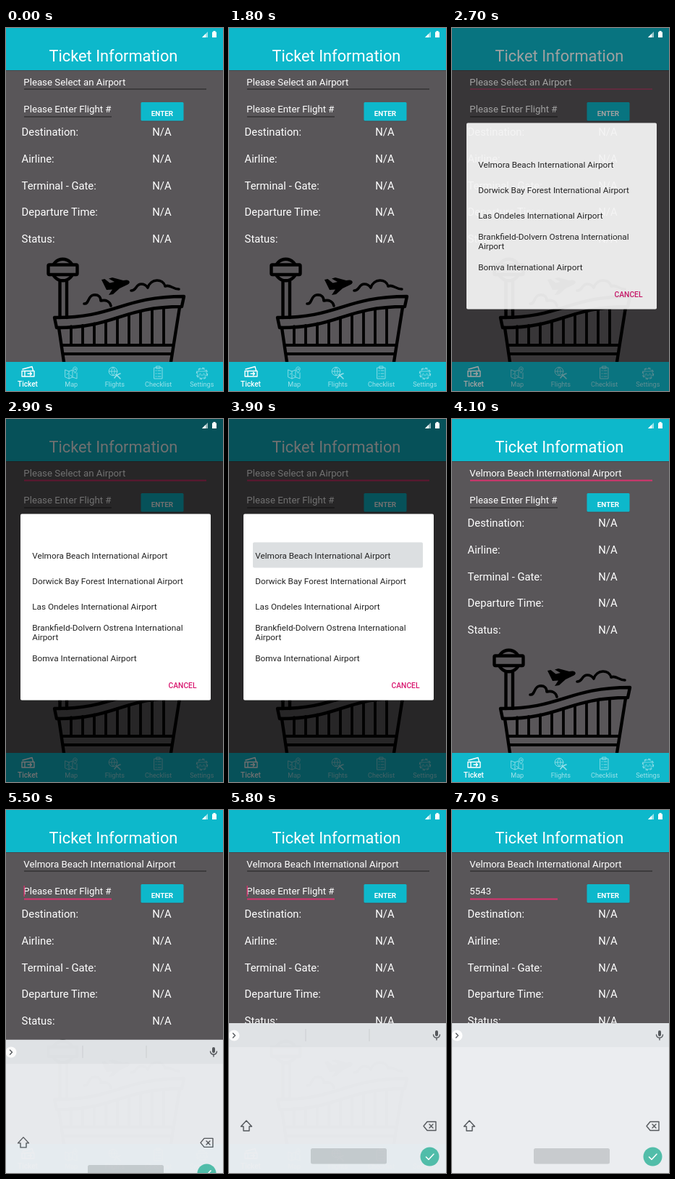
Animation of 300x499 px, one loop 8000 ms. Source, as an HTML page:

```html
<!DOCTYPE html>
<html lang="en">
<head>
<meta charset="utf-8">
<title>Ticket Information</title>
<style>
html, body { margin: 0; width: 100%; height: 100%; overflow: hidden; background: #595659; }
svg { display: block; width: 100vw; height: 100vh; }
text { font-family: Roboto, sans-serif; white-space: pre; }
.line { fill: none; stroke: #000; stroke-linecap: round; stroke-linejoin: round; }
.icon { fill: none; stroke: #fff; stroke-width: 1; stroke-linejoin: round; stroke-linecap: round; }
.key { fill: none; stroke: #54585c; stroke-width: 1.4; stroke-linejoin: round; stroke-linecap: round; }
</style>
</head>
<body>
<svg viewBox="0 0 300 499" xmlns="http://www.w3.org/2000/svg">
  <defs>
    <filter id="soft" x="-20%" y="-20%" width="140%" height="150%">
      <feDropShadow dx="0" dy=".6" stdDeviation=".6" flood-opacity=".3"/>
    </filter>
  </defs>
  <rect width="300" height="499" fill="#595659"/>

  <g class="line" stroke-width="4.4">
    <circle cx="78.5" cy="332.5" r="14.8"/>
    <rect x="58.5" y="325.5" width="40" height="13.5" rx="1.5" fill="#595659"/>
    <path d="M74.5 348V398M84 348V398"/>
    <path d="M67 398C150 399 160 369 246 369L243 383C160 383 152 412 70 412Z"/>
    <path d="M73 412L80 459M240 384L228 459"/>
    <path d="M77 436H231M79 448H229" stroke-width="3.8"/>
    <g id="posts"></g>
    <path d="M108 379C115 380 113 368 121 367C128 366 131 370 131 375C138 373 144 376 145 382" stroke-width="3.6"/>
    <path d="M173 361C181 361 179 352 187 352C192 352 194 354 196 357C200 344 217 344 220 355C227 352 230 359 239 359" stroke-width="3.6"/>
  </g>
  <path d="M132 346L136.500 345L143.500 350.500L150 349L142 344.500L147 343L162 347L166 346.500C171 346 172.500 350.500 168.500 352.500L157 358L148 366L142 367L147 359.500L139 360Z"/>

  <g filter="url(#soft)"><rect y="-4" width="300" height="62" fill="#10b8cb"/></g>
  <text x="59.500" y="45.500" font-size="21.8" fill="#fff">Ticket Information</text>

  <g fill="#fff" font-size="13.25">
    <text id="airport" x="24.300" y="79"></text>
    <text id="flight" x="24.300" y="116"></text>
  </g>
  <rect id="line1" x="25" width="252"/>
  <rect id="line2" x="25" width="121"/>
  <rect id="cursor" y="104" width="1.4" height="15" fill="#d8336f"/>
  <rect x="186.500" y="102" width="59" height="25.500" rx="1.5" fill="#10b8cb" filter="url(#soft)"/>
  <text x="216" y="120.500" font-size="9.9" font-weight="700" fill="#fff" text-anchor="middle">ENTER</text>
  <g id="rows" font-size="14.8" fill="#fff"></g>

  <rect y="459" width="300" height="40" fill="#10b8cb"/>
  <g id="tabs" fill="#fff" text-anchor="middle"></g>
  <g class="icon">
    <g stroke-width="1.4">
      <path d="M22 471.500H39V479H22ZM23 469L36 465.500L37.500 471M26 471.500V479"/>
      <path d="M30 475.200H35.500M33.500 473.200L35.500 475.200L33.500 477.200"/>
    </g>
    <g opacity=".55" stroke-width=".9">
      <path d="M82 470L87 472L92 470V480L87 482L82 480ZM87 472V482M92 480L98 482V474M84 476L86 475M89 477L91 479"/>
      <path d="M95.500 474C90.500 468 93.500 466 95.500 466S100.500 468 95.500 474Z"/>
      <circle cx="95.500" cy="469" r=".6"/>
      <circle cx="148" cy="472" r="5.8"/>
      <path d="M142.500 472H153.500M148 466.500C145 470 145 474 148 477.500M148 466.500C151 470 151 474 148 477.500"/>
      <path d="M152.500 476.500L158 482M150 481L153 477L158 475" stroke-width="1.6"/>
      <path d="M205 467H216V482H205ZM208 465H213V468H208ZM207 471H208M210 471H214M207 475H208M210 475H214M207 479H208M210 479H214"/>
      <circle cx="271" cy="475" r="7.6" stroke-width="1.2" stroke-linecap="butt" stroke-dasharray="3.500 2.469"/>
      <circle cx="271" cy="475" r="6.4" stroke-width=".7"/>
      <path d="M267 478C267 474 270 474 270 478M272 478C272 474 275 474 275 478M266 472H276" stroke-width=".8"/>
    </g>
  </g>

  <rect id="scrim" width="300" height="499"/>
  <g id="dialog">
    <rect x="20" y="130.500" width="263" height="256" rx="2" fill="#fff" filter="url(#soft)"/>
    <rect id="press" x="33" y="169.500" width="235" height="35" rx="2" fill="#dcdfe1"/>
    <g id="list" font-size="11.8" fill="#222"></g>
    <text x="224.500" y="370" font-size="10.3" font-weight="500" fill="#d8176f">CANCEL</text>
  </g>

  <g id="keys">
    <rect y="293" width="300" height="206" fill="#ebedf0"/>
    <rect y="293" width="300" height="33" fill="#e3e6e9"/>
    <path id="seps" d="M106 301V318M194 301V318" stroke="#cdd1d4" stroke-width="1"/>
    <circle cx="7" cy="310" r="7.500" fill="#fff"/>
    <path class="key" d="M5.500 307L8.500 310L5.500 313"/>
    <rect x="285" y="303" width="4" height="8" rx="2" fill="#54585c"/>
    <path class="key" d="M282.500 309C283 314.500 291 314.500 291.500 309M287 313V316" stroke-width="1.2"/>
    <path class="key" d="M24 427L31.500 435H28V441H20V435H16.500Z"/>
    <path class="key" d="M269 434.500L274 428.500H286V440.500H274ZM277 432L282 437M282 432L277 437"/>
    <rect x="113" y="465" width="105" height="21.500" rx="2.500" fill="#c8cbce"/>
    <circle cx="277.500" cy="476.500" r="13" fill="#52bda9"/>
    <path class="key" d="M272.500 477L276 480.500L283 473" style="stroke:#fff;stroke-width:1.6"/>
  </g>

  <path d="M271 13H279V5Z" fill="#fff" opacity=".6"/>
  <path d="M271 13H276V8Z" fill="#fff"/>
  <path d="M285 5.500H286.500V4H289.500V5.500H291V13H285Z" fill="#fff"/>
</svg>
<script>
const $ = id => document.getElementById(id);
const clamp = x => Math.max(0, Math.min(1, x));
const easeOut = x => 1 - (1 - clamp(x)) ** 2;

function add(parent, tag, attrs, label = '') {
  const el = document.createElementNS('http://www.w3.org/2000/svg', tag);
  for (const k in attrs) el.setAttribute(k, attrs[k]);
  el.textContent = label;
  $(parent).appendChild(el);
}
function set(id, attrs) {
  for (const k in attrs) $(id).setAttribute(k, attrs[k]);
}

const chosen = 'Velmora Beach International Airport';
const choices = [
  [191.5, chosen],
  [227, 'Dorwick Bay Forest International Airport'],
  [262, 'Las Ondeles International Airport'],
  [290.5, 'Brankfield-Dolvern Ostrena International'],
  [304, 'Airport'],
  [332.5, 'Bomva International Airport']
];
choices.forEach(([y, s]) => add('list', 'text', { x: 36.2, y }, s));

['Destination:', 'Airline:', 'Terminal - Gate:', 'Departure Time:', 'Status:'].forEach((s, i) => {
  const y = 148 + i * 36.8;
  add('rows', 'text', { x: 21.6, y }, s);
  add('rows', 'text', { x: 202.3, y }, 'N/A');
});
['Ticket', 'Map', 'Flights', 'Checklist', 'Settings'].forEach((s, i) => {
  add('tabs', 'text', {
    x: 30 + i * 60.2, y: 493, 'font-size': i ? 9.1 : 10.1,
    'font-weight': i ? 400 : 500, opacity: i ? .58 : 1
  }, s);
});
// window posts reach up to the sloping roof
for (let i = 0; i < 9; i++) {
  const x = 90 + i * 16;
  const top = 397.5 - 14.5 * Math.tanh((x - 156) / 48);
  add('posts', 'path', { d: `M${x} ${top}V436`, 'stroke-width': 3.8 });
}

const FOCUS = 5300;
const typing = [6300, 6500, 6800, 7100];

function underline(id, y, pink, thick) {
  set(id, { y: y - .5, height: thick ? 2 : 1, fill: pink ? '#d8336f' : '#232123' });
}

function draw(t) {
  // dialog
  const open = (t - 2500) / 300;
  const close = t < 4000 ? 1 : t < 4100 ? .4 : 0;
  set('dialog', { opacity: easeOut(open) * close });
  set('scrim', { opacity: .56 * clamp(open) * close });
  set('press', { opacity: clamp((t - 3600) / 200) });

  // fields
  const typed = typing.filter(k => t >= k).length;
  $('airport').textContent = t < 4000 ? 'Please Select an Airport' : chosen;
  $('flight').textContent = typed ? '5543'.slice(0, typed) : 'Please Enter Flight #';
  const first = t >= 2400 && t < FOCUS;
  const second = t >= FOCUS;
  underline('line1', 84, first, first && t >= 2800);
  underline('line2', 122, second, second);

  const last = typed ? typing[typed - 1] : 5500;
  const lit = t >= last && (t - last) % 1000 < 400;
  set('cursor', { x: 24.5 + typed * 7.45, opacity: lit ? 1 : 0 });

  // keyboard
  const rise = easeOut((t - FOCUS) / 300);
  set('keys', {
    transform: `translate(0 ${206 * (1 - rise)})`,
    opacity: t <= FOCUS ? 0 : t < 6200 ? .975 : 1
  });
  set('seps', { opacity: typed ? 0 : 1 });
}

const start = performance.now();
function tick() {
  const t = (performance.now() - start) % 8000;
  draw(Math.floor(t / 100) * 100);
  requestAnimationFrame(tick);
}
tick();
</script>
</body>
</html>
```
